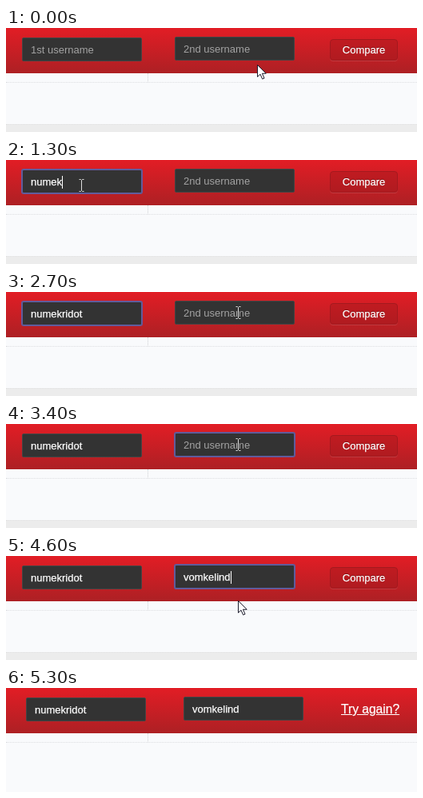
These frames come from a looping animation (514x131 px, 5700 ms). An HTML page:

```html
<!DOCTYPE html>
<html lang="en">
<head>
<meta charset="utf-8">
<title>Compare users</title>
<style>
  html, body { margin: 0; width: 100%; height: 100%; overflow: hidden; }
  body { background: #f9fafc; font: 13px/28px Arial, "Liberation Sans", sans-serif; }
  #stage { position: relative; width: 514px; height: 131px; overflow: hidden; background: #f9fafc; }
  #stage div, #stage svg { position: absolute; box-sizing: border-box; white-space: pre; }
  .header { left: 0; top: 0; width: 514px; height: 57px; background: linear-gradient(#e21d25, #ad2024); }
  .rule { left: 0; top: 68px; width: 514px; border-top: 1px dotted #dcdde0; }
  .tick { left: 177px; top: 57px; height: 12px; border-left: 1px dotted #cfd0d3; }
  .band { left: 0; top: 121px; width: 514px; height: 10px; background: #ececec; border-top: 1px dotted #e0e0e0; }
  .field { width: 150px; height: 30px; background: #333; border: 1px solid #444; border-radius: 2px; }
  .field.focus { border-color: #605c9c; box-shadow: 0 0 0 1px #605c9c; }
  .field div { left: 10px; top: 1px; }
  .hint { color: #a3a3a3; }
  .hint.ahead { color: #c4c4c4; }
  .typed, .button, .again { color: #fff; -webkit-text-stroke: .25px #fff; }
  .caret { display: inline-block; width: 1px; height: 16px; margin-right: -1px; background: #fff; vertical-align: -4px; }
  .button { left: 405px; top: 14px; width: 85px; height: 27px; border: 1px solid #a3191e; border-radius: 4px;
    background: linear-gradient(#c01b21, #b01b20); box-shadow: 0 1px 0 rgba(255, 255, 255, .12);
    line-height: 25px; text-align: center; text-shadow: 0 -1px 0 rgba(0, 0, 0, .3); }
  .button.down { background: #a3191e; }
  .again { left: 419px; top: 13px; font-size: 15.6px; text-decoration: underline; }
  .menu { left: 211px; top: 43px; width: 155px; height: 100px; background: #fafbfd; border: 1px solid #ccc; color: #111; }
  .menu div { left: 10px; }
  .menu b { color: #000; }
  #stage svg { left: 0; top: 0; overflow: visible; }
</style>
</head>
<body>
<div id="stage">
  <div class="header"></div>
  <div class="rule"></div>
  <div class="tick"></div>
  <div class="band"></div>
  <div class="field"><div class="hint"></div><div class="typed"></div></div>
  <div class="field"><div class="hint"></div><div class="typed"></div></div>
  <div class="button">Compare</div>
  <div class="again">Try again?</div>
  <div class="menu">
    <div style="top:9px"><b>vo</b>mkelind</div>
    <div style="top:54px"><b>Vo</b>lUdrask</div>
  </div>
  <svg width="20" height="20">
    <path id="arrow" d="M.5 .5V15.5L4 12.2L6.6 18.2L9 17.2L6.4 11.3H11.2Z" fill="#fff" stroke="#1c1c2c"/>
    <g id="beam" fill="none">
      <path d="M-3 -7.5H-1L0 -6.5L1 -7.5H3M0 -6.5V6.5M-3 7.5H-1L0 6.5L1 7.5H3" stroke="#333" stroke-width="2.4"/>
      <path d="M-3 -7.5H-1L0 -6.5L1 -7.5H3M0 -6.5V6.5M-3 7.5H-1L0 6.5L1 7.5H3" stroke="#ddd"/>
    </g>
  </svg>
</div>
<script>
const LOOP = 5700;
const FIRST = "numekridot", SECOND = "vomkelind";
const find = s => document.querySelector(s);
const fields = [...document.querySelectorAll(".field")];
const cursor = find("svg"), arrow = find("#arrow"), beam = find("#beam");

// Each track is a list of [time, ...values] held until the next entry.
const tracks = {
  pointer: [
    [0, 314, 46, "arrow"], [100, 268, 18, "beam"], [200, 165, 22, "beam"],
    [300, 110, 30, "beam"], [400, 94, 32, "beam"],
    [2400, 130, 35, "beam"], [2500, 188, 37, "arrow"], [2600, 262, 29, "beam"], [2700, 290, 26, "beam"],
    [4200, 290, 32, "beam"], [4300, 290, 46, "arrow"], [4400, 290, 56, "arrow"],
    [4700, 335, 48, "arrow"], [4800, 396, 36, "arrow"], [4900, 440, 29, "arrow"], [5200, 0, 0, "none"]
  ],
  focus: [[0, -1], [400, 0], [2900, 1], [5000, -1]],
  caret: [[0, 0], [400, 1], [2400, 0], [2900, 1], [3400, 0], [3600, 1], [4200, 0], [4500, 1], [5000, 0]],
  first: [[0, 0], [800, 1], [900, 2], [1100, 3], [1200, 4], [1300, 5], [1500, 7], [1700, 8], [1800, 9], [1900, 10]],
  second: [[0, 0], [3600, 1], [3700, 2], [4500, SECOND.length]],
  menu: [[0, 0], [3700, 1], [4500, 0]],
  down: [[0, 0], [5000, 1], [5100, 0]],
  done: [[0, 0], [5200, 1]],
  band: [[0, 1], [5300, 0]]
};

const at = (name, t) => tracks[name].findLast(step => step[0] <= t).slice(1);
const show = (el, on) => { el.style.display = on ? "" : "none"; };

function drawField(i, x, y, text, hint, focused, caret) {
  const el = fields[i], [hintEl, typedEl] = el.children;
  el.style.left = x + "px";
  el.style.top = y + "px";
  el.classList.toggle("focus", focused);
  hintEl.textContent = hint;
  hintEl.classList.toggle("ahead", text !== "");
  typedEl.textContent = text;
  if (focused && caret) {
    const bar = document.createElement("span");
    bar.className = "caret";
    typedEl.append(bar);
  }
}

function draw(t) {
  const [focus] = at("focus", t), [caret] = at("caret", t), [done] = at("done", t);
  const [menu] = at("menu", t), [band] = at("band", t), [down] = at("down", t);
  const a = FIRST.slice(0, at("first", t)[0]);
  const b = SECOND.slice(0, at("second", t)[0]);

  drawField(0, done ? 25 : 20, 12, a, a ? "" : "1st username", focus === 0, caret);
  drawField(1, done ? 222 : 211, 11, b, menu ? SECOND : b ? "" : "2nd username", focus === 1, caret);

  show(find(".menu"), menu);
  show(find(".band"), band);
  show(find(".button"), !done);
  show(find(".again"), done);
  find(".button").classList.toggle("down", !!down);

  const [x, y, shape] = at("pointer", t);
  cursor.style.transform = `translate(${x + (shape === "beam" ? .5 : 0)}px, ${y}px)`;
  show(arrow, shape === "arrow");
  show(beam, shape === "beam");
}

let last = -1;
function tick() {
  const t = performance.now() % LOOP;
  const slot = Math.floor(t / 100);
  if (slot !== last) draw(slot * 100);
  last = slot;
  requestAnimationFrame(tick);
}
tick();
</script>
</body>
</html>
```
